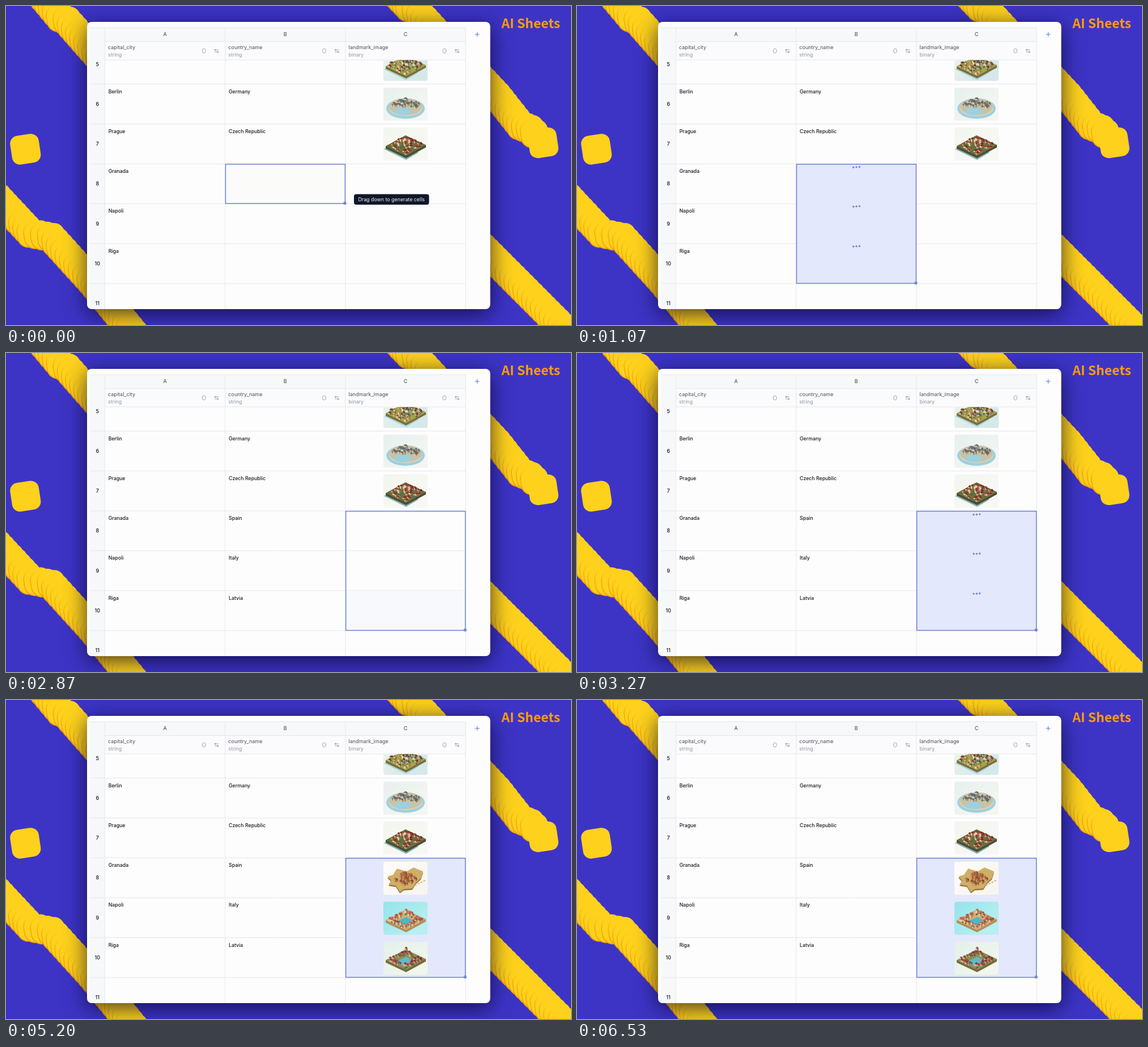
An HTML page with a canvas for the animation above (6590 ms loop, 997 by 562 pixels).

```html
<!DOCTYPE html>
<html lang="en">
<head>
<meta charset="utf-8">
<title>AI Sheets</title>
<style>
  html, body { margin: 0; width: 100%; height: 100%; overflow: hidden; background: #3d34c6; }
  canvas { display: block; width: 997px; height: 562px; }
</style>
</head>
<body>
<canvas id="stage" width="997" height="562"></canvas>
<script>
const W = 997, H = 562, LOOP = 6590;
const COLS = [174.5, 386.8, 599, 811];
const ROW_H = 70.3, ROW_6 = 137.5;
const SANS = 'Inter, "Liberation Sans", sans-serif';
const ACCENT = '#7488d2', LINE = '#e6e7ea', YELLOW = '#fdd11c', ORANGE = '#f5a60c';
const rowTop = n => ROW_6 + (n - 6) * ROW_H;

const view = document.getElementById('stage').getContext('2d');
const backdrop = document.createElement('canvas');
backdrop.width = W;
backdrop.height = H;
let g = backdrop.getContext('2d');

function box(x, y, w, h, r, fill) {
  g.beginPath();
  g.roundRect(x, y, w, h, r);
  g.fillStyle = fill;
  g.fill();
}

function line(x1, y1, x2, y2, color = LINE, width = 1) {
  g.beginPath();
  g.moveTo(x1, y1);
  g.lineTo(x2, y2);
  g.strokeStyle = color;
  g.lineWidth = width;
  g.stroke();
}

function poly(fill, ...points) {
  g.beginPath();
  for (const [x, y] of points) g.lineTo(x, y);
  g.closePath();
  g.fillStyle = fill;
  g.fill();
}

function oval(x, y, rx, ry, fill) {
  g.beginPath();
  g.ellipse(x, y, rx, ry, 0, 0, Math.PI * 2);
  g.fillStyle = fill;
  g.fill();
}

function text(str, x, y, { size = 8.85, weight = 400, color = '#17181c', align = 'left', family = SANS } = {}) {
  g.font = `${weight} ${size}px ${family}`;
  g.textAlign = align;
  g.textBaseline = 'alphabetic';
  g.fillStyle = color;
  g.fillText(str, x, y);
}

function seeded(seed) {
  return () => {
    seed = (seed * 16807) % 2147483647;
    return seed / 2147483647;
  };
}

// Background

function tilted(x, y, draw) {
  g.save();
  g.translate(x, y);
  g.rotate(-0.15);
  draw();
  g.restore();
}

const square = (x, y) => tilted(x, y, () => box(-25.5, -25.5, 51, 51, 14, YELLOW));

const link = (x, y) => tilted(x, y, () => {
  box(-25, -23, 48, 48, 19, ORANGE);
  box(-23.5, -24, 48, 47.5, 19, YELLOW);
});

function trail(...path) {
  for (let i = 1; i < path.length; i++) {
    const [x1, y1] = path[i - 1], [x2, y2] = path[i];
    const steps = Math.round(Math.hypot(x2 - x1, y2 - y1) / 11);
    for (let k = 0; k < steps; k++) {
      link(x1 + (x2 - x1) * k / steps, y1 + (y2 - y1) * k / steps);
    }
  }
}

function drawBackground() {
  g.fillStyle = '#3d34c6';
  g.fillRect(0, 0, W, H);
  trail([44, -42], [96, 20], [108, 26], [180, 108]);
  trail([-44, 306], [44, 400], [80, 407], [150, 484], [240, 594]);
  trail([670, -42], [712, 2], [724, 8], [800, 90]);
  trail([805, 92], [867, 158], [908, 210], [925, 217], [940, 232]);
  trail([810, 394], [1020, 604]);
  square(34.3, 252.3);
  square(947.7, 241);
  text('AI Sheets', 978, 39.4, {
    size: 23, weight: 700, color: '#ff9d0a', align: 'right',
    family: '"Noto Sans CJK SC", "Noto Sans CJK JP", "Noto Sans", sans-serif'
  });
}

// Sheet

function headerIcons(x) {
  const gray = '#a3a7af';
  g.strokeStyle = gray;
  g.lineWidth = 1;
  g.beginPath();
  g.ellipse(x, 79, 3, 3.9, 0, 0, Math.PI * 2);
  g.stroke();
  for (const [y, knob] of [[77.3, 20], [80.9, 24.5]]) {
    line(x + 18.5, y, x + 26, y, gray);
    oval(x + knob, y, 1.5, 1.5, gray);
  }
}

function drawSheet() {
  g.save();
  g.shadowColor = 'rgba(5, 3, 35, 0.75)';
  g.shadowBlur = 38;
  g.shadowOffsetY = 8;
  box(143, 28, 711.5, 506, 8, '#fdfdfe');
  g.restore();

  box(148, 38, 26.5, 496, [0, 0, 0, 4], '#f7f8fa');
  box(174.5, 38, 636.5, 24.5, 0, '#f7f8fa');
  box(174.5, 62.5, 636.5, 32.5, 0, '#fbfbfd');
  line(148, 38.2, 811, 38.2);
  line(174.5, 62.5, 811, 62.5);
  line(174.5, 95, 811, 95);
  for (const x of COLS) line(x, 38, x, 534);
  for (let n = 6; n <= 11; n++) line(148, rowTop(n), 811, rowTop(n));

  const headers = [['capital_city', 'string'], ['country_name', 'string'], ['landmark_image', 'binary']];
  headers.forEach(([name, type], i) => {
    const x = COLS[i];
    text('ABC'[i], x + 106, 53.3, { size: 9, color: '#3b3e46', align: 'center' });
    text(name, x + 5.5, 75.6, { size: 9.05, color: '#4b4f59' });
    text(type, x + 5.5, 88.6, { size: 9, color: '#9195a0' });
    headerIcons(x + 174.7);
  });
  line(827.5, 50, 835.5, 50, ACCENT, 1.2);
  line(831.5, 46, 831.5, 54, ACCENT, 1.2);

  for (let n = 5; n <= 11; n++) {
    text(n, 161.3, rowTop(n) + 38.3, { size: 9, weight: 500, align: 'center' });
  }
  ['Berlin', 'Prague', 'Granada', 'Napoli', 'Riga'].forEach((city, i) => cellText(city, 0, 6 + i));
  cellText('Germany', 1, 6);
  cellText('Czech Republic', 1, 7);

  g.save();
  g.beginPath();
  g.rect(600, 95.5, 210, 440);
  g.clip();
  for (const n of [5, 6, 7]) drawLandmark(n);
  g.restore();
}

const cellText = (str, col, row) => text(str, COLS[col] + 6.2, rowTop(row) + 16, { size: 8.75, weight: 500 });

// Isometric miniatures, one style per row

const LANDMARKS = {
  5: { sky: ['#f1f5ec', '#d5e8ea'], ground: '#a3a350', side: '#7d6b38', roofs: ['#7b4a38', '#d9a441', '#5d6675'], wall: '#e6dcbd', shade: '#8f8560', water: '#a5d6e0', count: 70, tower: 4 },
  6: { sky: ['#e6f0ee', '#f4f6f1'], ground: '#c9c2a4', side: '#d8d0b8', roofs: ['#6b7f88', '#527f8c', '#8d7462'], wall: '#d8cdb4', shade: '#98907c', water: '#9dd0e0', round: true, count: 56, tower: 13 },
  7: { sky: ['#f3f6ee', '#f7f8f3'], ground: '#66703f', side: '#4f4a35', roofs: ['#a8402f', '#b8553a', '#8b3228'], wall: '#e2cfa8', shade: '#8f7154', water: '#7fb5b5', count: 85, tower: 14 },
  8: { sky: ['#fefdfb', '#f8f5f0'], ground: '#cfae68', side: '#9b7440', roofs: ['#b3693c', '#c98350', '#995434'], wall: '#d69a62', shade: '#a0653a', coast: true, count: 60, tower: 10 },
  9: { sky: ['#93e4ea', '#b8eff0'], ground: '#d2ae7a', side: '#b28d59', roofs: ['#c9735a', '#b85d49', '#d9906c'], wall: '#eccfa2', shade: '#a87f5c', water: '#48b9c8', pond: true, count: 85, tower: 9 },
  10: { sky: ['#e2f1ea', '#f0f6ec'], ground: '#8a9253', side: '#77683f', roofs: ['#a5463f', '#8f3b3d', '#b35a4a'], wall: '#d6b78c', shade: '#8b6c53', water: '#62b9c9', pond: true, count: 75, tower: 13 }
};

function house({ x, y, w, h, roof }, { wall, shade }) {
  const top = [x, y - h - w * 1.4], eave = y - h - w / 2;
  poly(wall, [x - w, y - w / 2], [x, y], [x, y - h], [x - w, eave]);
  poly(shade, [x + w, y - w / 2], [x, y], [x, y - h], [x + w, eave]);
  poly(roof, [x - w, eave], [x, y - h], [x + w, eave], top);
  poly('rgba(50, 25, 30, 0.3)', [x + w, eave], [x, y - h], top);
}

function drawIslandBase(s) {
  if (s.round) {
    oval(39, 37, 34, 18, s.water);
    oval(39, 36, 30, 14.5, s.side);
    oval(39, 33.5, 29, 14.5, s.ground);
    oval(34, 42, 15, 6.5, s.water);
  } else if (s.coast) {
    const coast = [[7, 26], [17, 23], [24, 12], [41, 17], [53, 10], [70, 17], [66, 29], [57, 37], [51, 47], [36, 48], [29, 53], [22, 42], [9, 40], [14, 33]];
    poly(s.side, ...coast.map(([x, y]) => [x, y + 2.5]));
    poly(s.ground, ...coast);
    for (let i = 0; i < 4; i++) oval(57 + i * 5, 41 - i * 2.5, 2, 1, s.ground);
  } else {
    if (!s.pond) poly(s.water, [1, 38], [22, 27], [62, 44], [40, 57]);
    poly(s.side, [4, 33], [39, 14], [75, 31], [75, 35], [40, 54], [4, 37]);
    poly(s.ground, [4, 33], [39, 14], [75, 31], [40, 50]);
    if (s.pond) poly(s.water, [22, 36], [40, 27], [57, 35], [40, 46]);
  }
}

function drawLandmark(row) {
  const s = LANDMARKS[row], rand = seeded(row * 7919 + 13);
  g.save();
  g.translate(666, rowTop(row) + (row < 8 ? 6.2 : 6.8));
  g.beginPath();
  g.roundRect(0, 0, 78, 58.5, 4);
  g.clip();
  const sky = g.createLinearGradient(0, 0, 50, 58);
  s.sky.forEach((color, i) => sky.addColorStop(i, color));
  g.fillStyle = sky;
  g.fillRect(0, 0, 78, 58.5);
  drawIslandBase(s);

  const items = [];
  const spread = s.coast ? 0.6 : s.round ? 0.75 : 0.9;
  while (items.length < s.count) {
    const u = (rand() * 2 - 1) * spread, v = (rand() * 2 - 1) * spread;
    if (s.pond && Math.abs(u) < 0.5 && Math.abs(v) < 0.5) continue;
    if (s.round && u + v > 0.3 && Math.abs(u - v) < 0.9) continue;
    const central = Math.max(0, 1 - Math.hypot(u + 0.2, v + 0.2) * 1.5);
    items.push({
      x: 39 + (u - v) * 17.5, y: 34 + (u + v) * 9,
      w: 1.8 + rand() * 1.6, h: 1.5 + rand() * 2 + central * s.tower * rand() * 0.7,
      tree: rand() < 0.32, roof: s.roofs[Math.floor(rand() * s.roofs.length)]
    });
  }
  items.push({ x: 40, y: s.pond ? 23 : 31, w: 2.6, h: s.tower * 0.8, roof: s.roofs[0] });
  items.sort((a, b) => a.y - b.y);
  for (const item of items) {
    if (item.tree) {
      oval(item.x, item.y - 1.5, 1.6, 1.8, s.coast ? '#8a7a3c' : '#55703d');
    } else {
      house(item, s);
    }
  }
  g.restore();
}

// Animated layer

function fillCells(col, first, last, color) {
  g.fillStyle = color;
  g.fillRect(COLS[col], rowTop(first), 212.2, rowTop(last + 1) - rowTop(first));
}

function outline(col, last, color = ACCENT, width = 1.6) {
  const x = COLS[col] + 0.6, y = rowTop(8) + 0.6;
  g.strokeStyle = color;
  g.lineWidth = width;
  g.strokeRect(x, y, 211, rowTop(last + 1) - y - 0.4);
}

function handle(col, last) {
  oval(COLS[col] + 211.2, rowTop(last + 1) - 1, 2.7, 2.7, ACCENT);
}

function selection(col, last, fill) {
  if (fill) fillCells(col, 8, last, fill);
  outline(col, last);
  handle(col, last);
}

function loadingDots(col, t) {
  for (let row = 8; row <= 10; row++) {
    const y = rowTop(row) + (row === 8 ? 6 : 4.8);
    for (let i = 0; i < 3; i++) {
      const bounce = 0.6 * Math.sin(t / 160 - i * 0.8);
      oval(COLS[col] + 101 + i * 5.3, y + bounce, 1.7, 1.7, ACCENT);
    }
  }
}

function tooltip() {
  box(614, 331.5, 132.5, 18.5, 4, '#10172a');
  text('Drag down to generate cells', 680.2, 344, { color: '#f5f6fa', align: 'center' });
}

const SELECTED = '#e3e8fc', EMPTY = '#fbfbf9';

function drawColumnB(t) {
  if (t < 730) {
    selection(1, 8, EMPTY);
    tooltip();
  } else if (t < 1000) {
    selection(1, t < 800 ? 9 : 10);
  } else if (t < 1870) {
    selection(1, 10, SELECTED);
  } else if (t < 2130) {
    fillCells(1, 8, 10, SELECTED);
    outline(1, 10, '#b7c3ee', 1);
  }
  if (t >= 1000 && t < 1600) loadingDots(1, t);
  if (t >= 1600) ['Spain', 'Italy', 'Latvia'].forEach((name, i) => cellText(name, 1, 8 + i));
}

function drawColumnC(t) {
  if (t < 1930) return;
  if (t < 2130) {
    fillCells(2, 8, 8, EMPTY);
    outline(2, 8, '#d3d7e6', 1.4);
    handle(2, 8);
  } else if (t < 2670) {
    selection(2, 8, EMPTY);
  } else if (t < 3130) {
    const last = t < 2800 ? 9 : 10;
    if (last === 10) fillCells(2, 10, 10, '#f8f9fc');
    selection(2, last);
  } else {
    selection(2, 10, SELECTED);
    if (t < 4670) loadingDots(2, t);
    else for (const n of [8, 9, 10]) drawLandmark(n);
  }
}

drawBackground();
drawSheet();
g = view;

function frame(now) {
  const t = now % LOOP;
  g.drawImage(backdrop, 0, 0);
  drawColumnB(t);
  drawColumnC(t);
  requestAnimationFrame(frame);
}
requestAnimationFrame(frame);
</script>
</body>
</html>
```
